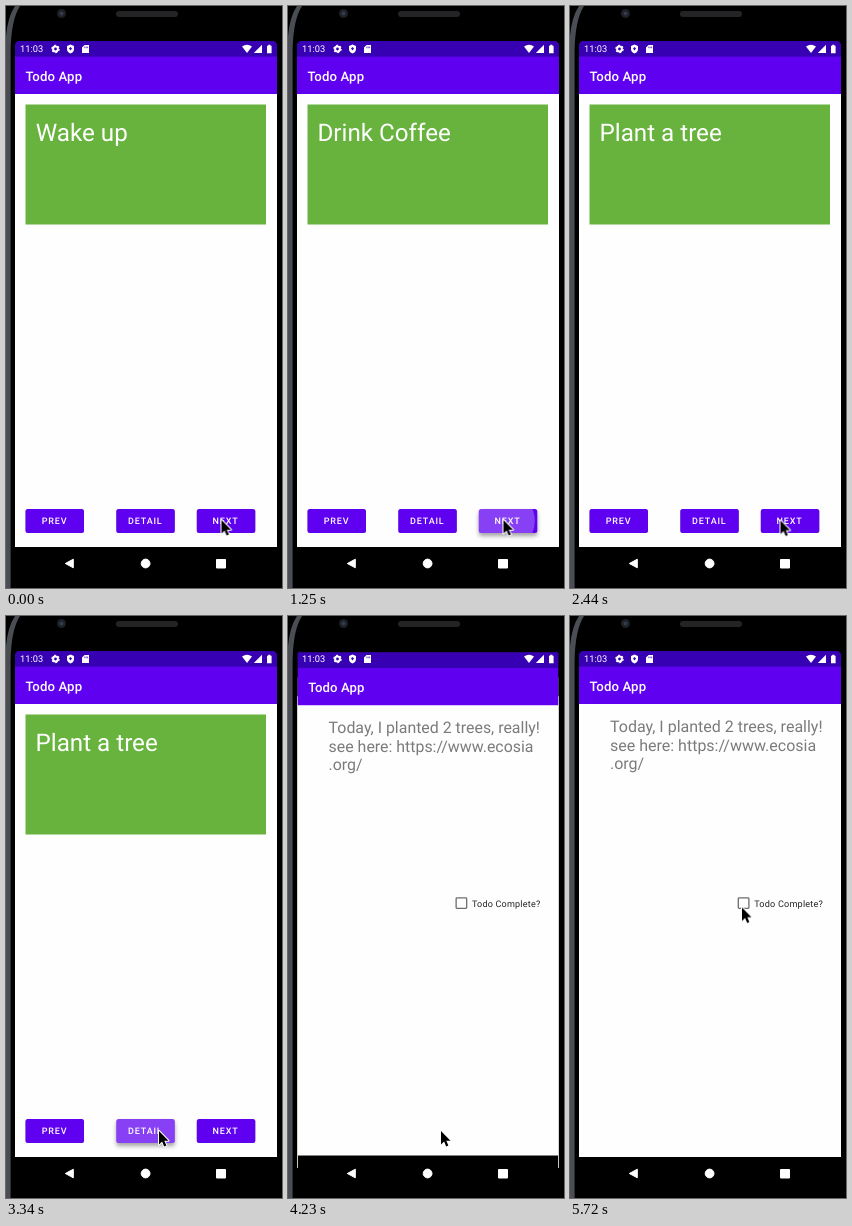
An HTML page that plays this animation: 276x582 px, repeating every 8 s.

```html
<!DOCTYPE html>
<html lang="en">
<head>
<meta charset="utf-8">
<title>Todo App</title>
<style>
  html, body { margin: 0; width: 100%; height: 100%; overflow: hidden; background: #000; }
  svg { display: block; width: 276px; height: 582px; font-family: Roboto, "Open Sans", sans-serif; text-rendering: geometricPrecision; }
  .title { font-size: 13.2px; font-weight: 500; letter-spacing: .12px; fill: #fff; }
  .task { font-size: 24.2px; fill: #fff; }
  .label { font-size: 9px; font-weight: 500; letter-spacing: .85px; fill: #fff; }
  .note { font-size: 16px; fill: #7b7b7b; }
  .check { font-size: 9.1px; letter-spacing: .2px; fill: #222; }
  .clock { font-size: 9.3px; fill: #fff; }
  .btn { --lift: .8px; filter: drop-shadow(0 var(--lift) calc(var(--lift) * .7) rgba(0, 0, 0, .36)); }
  .ripple { fill: #fff; fill-opacity: 0; }
  .screen { transform: scale(var(--zoom)); transform-origin: 140px 293px; }

  /* everything holds still between steps */
  .wake, .coffee, .tree, .list, .detail, .next, .next .ripple,
  .more, .more .ripple, .cursor { animation: 8s step-end infinite; }
  .wake { animation-name: wake; }
  .coffee { animation-name: coffee; }
  .tree { animation-name: tree; }
  .list { animation-name: list; }
  .detail { animation-name: detail; }
  .next { animation-name: lift-next; }
  .next .ripple { animation-name: ripple-next; }
  .more { animation-name: lift-more; }
  .more .ripple { animation-name: ripple-more; }
  .cursor { animation-name: cursor; }

  @keyframes wake { 0% { fill-opacity: 1 } 8.125%, 100% { fill-opacity: 0 } }
  @keyframes coffee { 0% { fill-opacity: 0 } 8.125% { fill-opacity: 1 } 25%, 100% { fill-opacity: 0 } }
  @keyframes tree { 0% { fill-opacity: 0 } 25%, 100% { fill-opacity: 1 } }

  @keyframes list {
    0% { --zoom: 1; visibility: visible }
    51% { --zoom: 1.002; visibility: visible }
    52.875% { --zoom: 1.044; visibility: visible }
    54.75%, 100% { --zoom: 1; visibility: hidden }
  }
  @keyframes detail {
    0% { --zoom: .994; visibility: hidden }
    52.875% { --zoom: .994; visibility: visible }
    54.75%, 100% { --zoom: 1; visibility: visible }
  }

  @keyframes lift-next {
    0%, 10%, 19.375%, 26.875%, 100% { --lift: .8px }
    6.25%, 15.625%, 23.125% { --lift: 3px }
    8.125%, 17.5%, 25% { --lift: 1.5px }
  }
  @keyframes ripple-next {
    0%, 10%, 19.375%, 26.875%, 100% { r: 0px; fill-opacity: 0 }
    6.25%, 15.625%, 23.125% { r: 32px; fill-opacity: .25 }
    8.125%, 17.5%, 25% { r: 60px; fill-opacity: .11 }
  }
  @keyframes lift-more {
    0%, 45.375%, 100% { --lift: .8px }
    39.875%, 43.625% { --lift: 1.5px }
    41.75% { --lift: 3px }
  }
  @keyframes ripple-more {
    0%, 45.375%, 100% { r: 0px; fill-opacity: 0 }
    39.875% { r: 21px; fill-opacity: .2 }
    41.75% { r: 60px; fill-opacity: .25 }
    43.625% { r: 60px; fill-opacity: .11 }
  }

  @keyframes cursor {
    0% { transform: translate(215.5px, 514px) }
    30.5% { transform: translate(210.5px, 514.5px) }
    32.375% { transform: translate(188px, 518px) }
    34.25% { transform: translate(162px, 517px) }
    36.125% { transform: translate(153px, 515px) }
    60.375% { transform: translate(157px, 456px) }
    62.25% { transform: translate(170px, 357px) }
    64.125% { transform: translate(176.5px, 315px) }
    67.75% { transform: translate(174px, 306px) }
    69.625% { transform: translate(172px, 296px) }
    71.5%, 100% { transform: translate(172px, 291.5px) }
  }
</style>
</head>
<body>
<svg viewBox="0 0 276 582">
  <defs>
    <clipPath id="screen"><rect x="9" y="35" width="262" height="560" rx="5"/></clipPath>
    <clipPath id="face"><rect width="58.5" height="24" rx="2.5"/></clipPath>
    <g id="bars">
      <rect x="9" y="35" width="262" height="547"/>
      <rect x="9" y="60" width="262" height="481" fill="#fefefe"/>
      <rect x="9" y="35" width="262" height="53" fill="#6000f0"/>
      <rect x="9" y="35" width="262" height="15.6" fill="#3700b3"/>
      <text class="title" x="19.5" y="74.5">Todo App</text>
    </g>
    <rect id="plate" width="58.5" height="24" rx="2.5" fill="#6000f0"/>
  </defs>

  <!-- phone body -->
  <rect width="276" height="582"/>
  <path d="M0 582V30Q2 10 9 0H14Q5 14 4.6 45V582Z" fill="#4b4d54"/>
  <circle cx="55.5" cy="7.5" r="4.5" fill="#1d2026"/>
  <circle cx="55.5" cy="7.5" r="2" fill="#343b4c"/>
  <rect x="110" y="5" width="62" height="6" rx="3" fill="#242426"/>

  <g clip-path="url(#screen)">
    <g class="screen list">
      <use href="#bars"/>
      <rect x="19.5" y="98.5" width="240.5" height="120" fill="#67b33e"/>
      <g class="task">
        <text class="wake" x="29.8" y="135">Wake up</text>
        <text class="coffee" x="29.5" y="135">Drink Coffee</text>
        <text class="tree" x="29.5" y="135">Plant a tree</text>
      </g>
      <g transform="translate(19.5 503)">
        <use class="btn" href="#plate"/>
        <text class="label" x="16.2" y="15.4">PREV</text>
      </g>
      <g transform="translate(110.3 503)">
        <g class="more">
          <use class="btn" href="#plate" style="--lift: inherit"/>
          <g clip-path="url(#face)"><circle class="ripple" cx="43" cy="12"/></g>
        </g>
        <text class="label" x="11.8" y="15.4">DETAIL</text>
      </g>
      <g transform="translate(190.8 503)">
        <g class="next">
          <use class="btn" href="#plate" style="--lift: inherit"/>
          <g clip-path="url(#face)"><circle class="ripple" cx="24" cy="12"/></g>
        </g>
        <text class="label" x="15.8" y="15.4">NEXT</text>
      </g>
    </g>

    <g class="screen detail">
      <rect y="30" width="276" height="49"/>
      <use href="#bars"/>
      <g class="note">
        <text x="40" y="116">Today, I planted 2 trees, really!</text>
        <text x="40" y="134.7">see here: https://www.ecosia</text>
        <text x="40" y="153.4">.org/</text>
      </g>
      <rect x="168.3" y="281.8" width="10.6" height="10.6" rx=".8" fill="none" stroke="#6c6c6c" stroke-width="1.3"/>
      <text class="check" x="184.2" y="290.5">Todo Complete?</text>
    </g>
  </g>

  <!-- status icons -->
  <g fill="#fff">
    <text class="clock" x="14" y="46.3">11:03</text>
    <g fill="none" stroke="#fff">
      <circle cx="49.5" cy="43" r="2.4" stroke-width="2"/>
      <circle cx="49.5" cy="43" r="3.6" stroke-width="1.3" stroke-dasharray="1.885"/>
    </g>
    <path d="M64.5 38.6L68 40V43Q68 46 64.5 47.6Q61 46 61 43V40Z"/>
    <path d="M64.5 41L66 42.6L64.5 44.6L63 42.6Z" fill="#3700b3"/>
    <path d="M78.6 39H83V47H76V41.6Z"/>
    <path d="M78.8 40.6V42.2M80.2 40.6V42.2M81.6 40.6V42.2" stroke="#3700b3" stroke-width=".7"/>
    <path d="M236 40.6Q241 37 246 40.6L241 47Z"/>
    <path d="M256 38.8V47H247.8Z"/>
    <path d="M261 39.8H262.2V38.8H264.4V39.8H265.6V47.2H261Z"/>
  </g>

  <!-- navigation keys -->
  <g fill="#fff" stroke="#fff" stroke-linejoin="round">
    <path d="M59.3 557.5L67.3 553.2V561.8Z"/>
    <circle cx="139.6" cy="557.5" r="4.4"/>
    <rect x="210.5" y="553.5" width="9" height="8.5"/>
  </g>

  <g class="cursor">
    <path d="M0 0V13.4L3.1 10.6L5.2 15.4L7.4 14.4L5.3 9.8H9.5Z" stroke="#fff" stroke-width="2" stroke-linejoin="round" paint-order="stroke"/>
  </g>
</svg>
</body>
</html>
```
